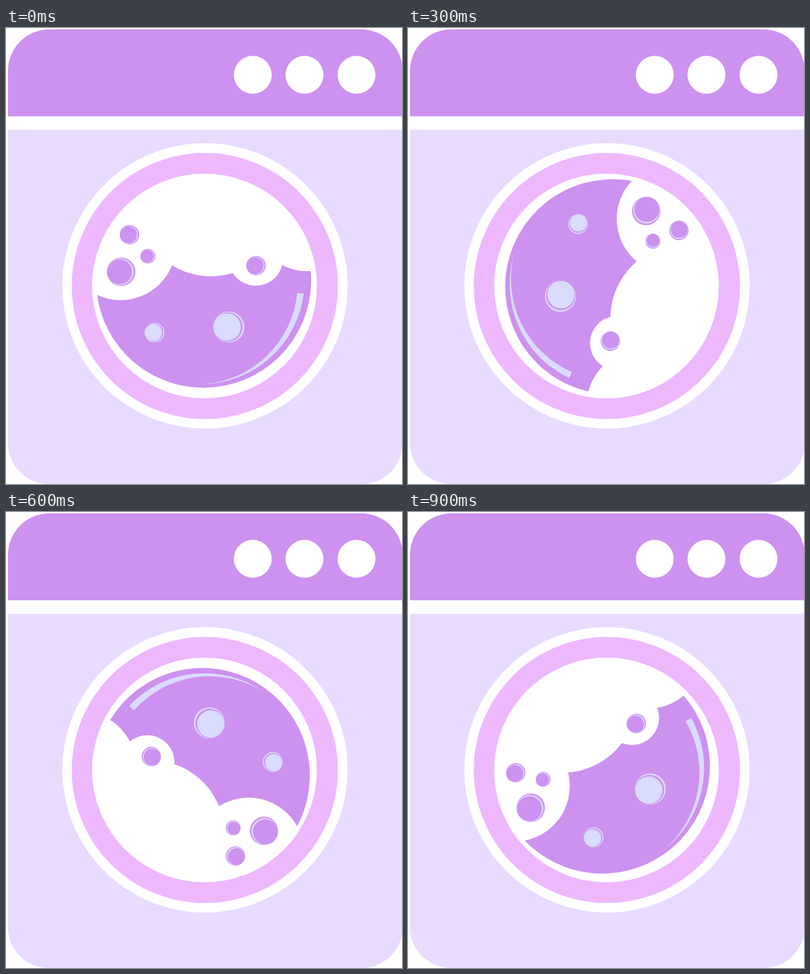
An HTML page for the animation above (1000 ms loop, 601 by 692 pixels).

```html
<!DOCTYPE html>
<html lang="en">
<head>
<meta charset="utf-8">
<title>Washing machine</title>
<style>
  html, body { margin: 0; width: 100%; height: 100%; overflow: hidden; background: #fff; }
  svg { display: block; width: 100%; height: 100%; }
  .purple { fill: #cd91ef; }
  .light { fill: #d9dbff; }
  .white { fill: #fff; }
</style>
</head>
<body>
<svg viewBox="0 0 601 692">
  <clipPath id="glass"><circle cx="301.3" cy="391.5" r="170.5"/></clipPath>
  <path class="purple" d="M3 134V65A63 63 0 0 1 66 2H539A63 63 0 0 1 602 65V134Z"/>
  <path fill="#e8dbff" d="M3 154.5H602V630A62 62 0 0 1 540 692H65A62 62 0 0 1 3 630Z"/>
  <g id="buttons"></g>
  <circle class="white" cx="302" cy="391.3" r="216.5"/>
  <circle fill="#eeb8ff" cx="301.8" cy="391.5" r="202"/>
  <circle class="white" cx="301.3" cy="391.5" r="170.5"/>
  <g clip-path="url(#glass)"><g id="drum"></g></g>
</svg>
<script>
  const NS = 'http://www.w3.org/2000/svg';
  const STEP_MS = 100, STEPS = 10;
  const drum = document.getElementById('drum');
  const buttons = document.getElementById('buttons');

  function add(parent, tag, attrs) {
    const el = document.createElementNS(NS, tag);
    for (const key in attrs) el.setAttribute(key, attrs[key]);
    parent.appendChild(el);
  }

  const disc = (parent, cx, cy, r, cls) => add(parent, 'circle', { cx, cy, r, class: cls });

  // Three nested discs touching on the left leave a crescent on the right.
  function bubble(x, y, r, fill, gap) {
    const rim = r * 0.06, inset = r * 0.12;
    disc(drum, x, y, r, fill);
    disc(drum, x - rim, y, r - rim, gap);
    disc(drum, x - inset, y, r - inset, fill);
  }

  for (const x of [374.5, 453, 532]) disc(buttons, x, 71, 28.8, 'white');

  // Water, then the foam that covers its upper part
  disc(drum, 299.9, 382.7, 163.3, 'purple');
  const foam = [[174, 329, 84], [311, 266, 111], [379.2, 350, 41.2], [457, 285, 84]];
  for (const [x, y, r] of foam) disc(drum, x, y, r, 'white');

  const foamBubbles = [[187.5, 313.7, 14.7], [215.3, 346.2, 11.3], [174.8, 370, 21.6], [379.5, 360.7, 14.7]];
  for (const [x, y, r] of foamBubbles) bubble(x, y, r, 'purple', 'light');

  const waterBubbles = [[225.5, 462.3, 15], [338.3, 453.8, 23.6]];
  for (const [x, y, r] of waterBubbles) bubble(x, y, r, 'light', 'purple');

  add(drum, 'path', {
    class: 'light',
    d: 'M297 540.5A157.4 157.4 0 0 0 452 403L442 402A153.7 153.7 0 0 1 297 540.5Z'
  });

  function render(ms) {
    const step = Math.floor(ms / STEP_MS) % STEPS;
    drum.setAttribute('transform', `rotate(${step * 360 / STEPS} 301.7 391.7)`);
  }

  let start;
  function tick(now) {
    start ??= now;
    render(now - start);
    requestAnimationFrame(tick);
  }
  render(0);
  requestAnimationFrame(tick);
</script>
</body>
</html>
```
